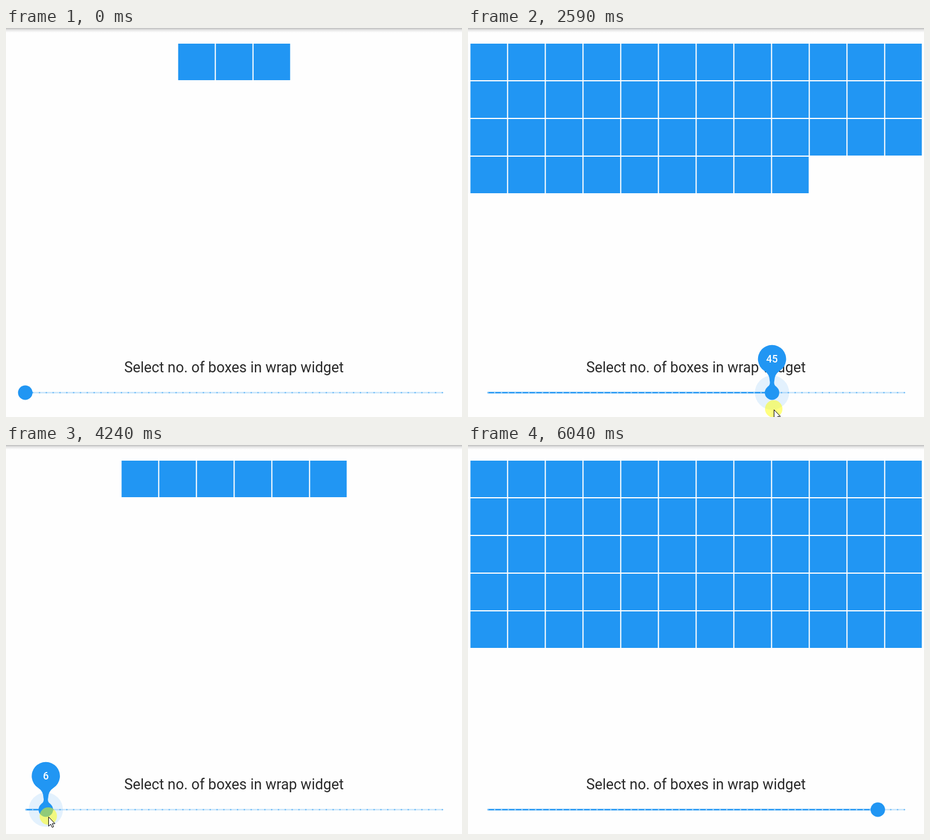
An HTML page that plays this animation: 786 by 671 pixels, repeating every 6550 ms.

```html
<!DOCTYPE html>
<html lang="en">
<head>
<meta charset="utf-8">
<title>Wrap widget</title>
<style>
  html, body { margin: 0; width: 100%; height: 100%; overflow: hidden; background: #fefefe; }
  svg { display: block; font-family: Roboto, sans-serif; text-anchor: middle; }
</style>
</head>
<body>
<svg width="786" height="671" viewBox="0 0 786 671">
  <defs>
    <linearGradient id="shade" x2="0" y2="1">
      <stop offset="0" stop-color="#000" stop-opacity=".26"/>
      <stop offset=".45" stop-color="#000" stop-opacity=".09"/>
      <stop offset="1" stop-color="#000" stop-opacity="0"/>
    </linearGradient>
  </defs>
  <rect width="786" height="8" fill="url(#shade)"/>
  <path id="boxes" fill="#2196f3"/>
  <text x="393" y="594" font-size="25" fill="#2a2a2a">Select no. of boxes in wrap widget</text>

  <g fill="none" stroke-width="2.5" stroke-linecap="round">
    <path d="M34.25 629H752.25" stroke="#2196f3" stroke-opacity=".24"/>
    <path d="M34.25 629H752.5" stroke="#2196f3" stroke-opacity=".54" stroke-dasharray="0 11.77"/>
    <path id="active" stroke="#2196f3"/>
    <path id="ticks" stroke="#fff" stroke-opacity=".54" stroke-dasharray="0 11.77"/>
  </g>
  <g id="thumb" fill="#2196f3">
    <circle id="halo" fill-opacity=".12"/>
    <circle r="12.5"/>
    <g id="balloon">
      <path d="M-8-9.5A10 10 0 0 0-4-20.2A21 21 0 0 0-13.4-37.7A24.3 24.3 0 1 1 13.4-37.7A21 21 0 0 0 4-20.2A10 10 0 0 0 8-9.5Z"/>
      <text id="label" y="-52" font-size="17.5" font-weight="500" fill="#fff"></text>
    </g>
  </g>
  <g id="cursor">
    <circle id="spot" r="15" fill="#ff0" fill-opacity=".5"/>
    <path d="M.5 1.5V17.5L4.2 14L6.7 19.5L9.2 18.4L6.8 13H11.5Z" fill="#fff" stroke="#000"/>
  </g>
</svg>
<script>
const LOOP = 6550, PRESS = 1040, RELEASE = 5560;
const COLS = 12, PITCH = 65, SIZE = 63;
const MIN = 3, START = 33.2, STEP = 11.81;   // slider value range in pixels
const LAG = 55, GLIDE = 75;                  // value trails cursor, thumb trails value (ms)
const $ = id => document.getElementById(id);
const clamp = x => Math.max(0, Math.min(1, x));

// cursor path: time, x, y
const path = [
  [110, 340, 658], [200, 106, 622], [320, 106, 622], [400, 37, 601], [530, 37, 601],
  [870, 37, 633], [1180, 37, 633], [1330, 82, 635], [1670, 325, 650], [1950, 422, 655],
  [2320, 505, 657], [2590, 527, 657], [2790, 527, 657], [3480, 296, 645], [3610, 217, 644],
  [4140, 70, 640], [4200, 70, 640], [4640, 293, 645], [4770, 473, 647], [5280, 707, 647],
  [5530, 707, 647], [6000, 710, 692]
];

// monotone cubic interpolation along the path
function cursor(t, col) {
  const last = path.length - 1;
  if (t <= path[0][0]) return path[0][col];
  if (t >= path[last][0]) return path[last][col];
  const slope = j => j < 0 || j >= last ? 0
    : (path[j + 1][col] - path[j][col]) / (path[j + 1][0] - path[j][0]);
  const tangent = j => {
    const p = slope(j - 1), q = slope(j);
    return p * q > 0 ? 2 * p * q / (p + q) : 0;
  };
  const i = path.findLastIndex(k => k[0] <= t), a = path[i], b = path[i + 1];
  const h = b[0] - a[0], u = (t - a[0]) / h, w = 1 - u;
  return w * w * ((1 + 2 * u) * a[col] + u * h * tangent(i))
    + u * u * ((3 - 2 * u) * b[col] - w * h * tangent(i + 1));
}

// whole slider steps reached at time t
function steps(t) {
  return Math.max(0, Math.round((cursor(Math.max(PRESS, t - LAG), 1) - START) / STEP));
}

// the thumb glides through the recent steps
function thumbX(t) {
  const N = 16;
  let sum = 0;
  for (let i = 0; i < N; i++) sum += steps(t - GLIDE * i / (N - 1));
  return START + STEP * sum / N;
}

function boxPath(n) {
  const left = 393.25 - (Math.min(n, COLS) * PITCH - (PITCH - SIZE)) / 2;
  let d = "";
  for (let i = 0; i < n; i++) {
    const x = left + i % COLS * PITCH, y = 27 + Math.floor(i / COLS) * PITCH;
    d += `M${x} ${y}h${SIZE}v${SIZE}h-${SIZE}z`;
  }
  return d;
}

function draw(now) {
  const t = now % LOOP, n = MIN + steps(t), x = thumbX(t);
  const press = clamp((t - PRESS) / 100) * clamp(1 - (t - RELEASE) / 100);
  const track = x > 36 ? `M34.25 629H${x}` : "";

  $("boxes").setAttribute("d", boxPath(n));
  $("active").setAttribute("d", track);
  $("ticks").setAttribute("d", track);
  $("thumb").setAttribute("transform", `translate(${x} 629)`);
  $("halo").setAttribute("r", 29.5 * press);
  $("balloon").setAttribute("transform", `scale(${press})`);
  $("label").textContent = n;
  $("cursor").setAttribute("transform", `translate(${cursor(t, 1)} ${cursor(t, 2)})`);
  $("cursor").style.display = t >= 110 && t < 6000 ? "" : "none";
  $("spot").style.display = t >= 830 && t < RELEASE ? "" : "none";
  requestAnimationFrame(draw);
}
requestAnimationFrame(draw);
</script>
</body>
</html>
```
